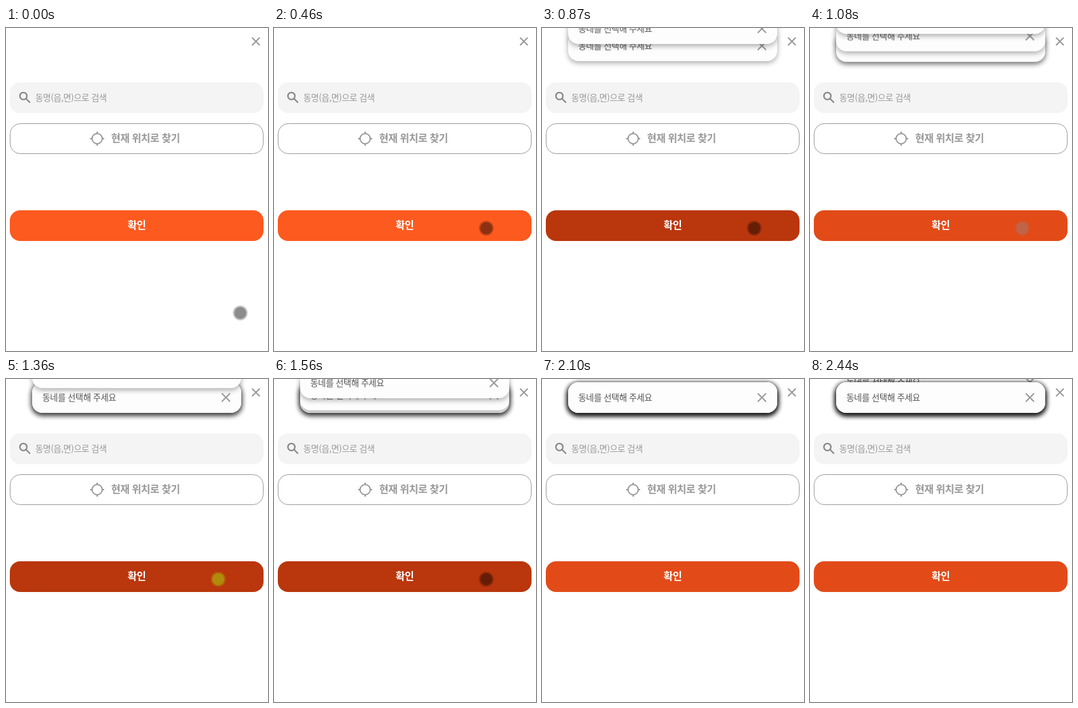
Write an HTML page that moves like this. It is 411x505 px and loops after 2.51 s.

```html
<!DOCTYPE html>
<html lang="ko">
<head>
<meta charset="utf-8">
<title>동네 선택</title>
<style>
  html, body { margin: 0; width: 100%; height: 100%; overflow: hidden; background: #fff; }
  body { position: relative; font-family: "Noto Sans CJK KR", "Noto Sans CJK", "Noto Sans", sans-serif; }
  svg { display: block; }
  text { letter-spacing: -.03em; }
  .small { font-size: 13.6px; }
  .large { font-size: 16px; font-weight: 600; }
  .icon { fill: none; stroke: #999; stroke-width: 2; }
  #screen { position: absolute; left: 0; top: 0; }
  .toast {
    position: absolute; left: 41px; top: 5px; width: 328px; height: 48px;
    border-radius: 16px; background: #fdfdfd;
    box-shadow: 0 3px 8px rgba(0, 0, 0, .34);
    transform: translateY(-90px);
  }
  .toast.leaving { box-shadow: none; }
  #cursor {
    position: absolute; left: -12px; top: -12px; width: 24px; height: 24px;
    color: rgba(0, 0, 0, .45);
  }
</style>
</head>
<body>
<svg id="screen" width="411" height="505">
  <path class="icon" d="M386 15l12 12m0-12l-12 12"/>

  <rect x="6" y="85" width="398" height="48" rx="16" fill="#f4f4f4"/>
  <g class="icon" style="stroke:#888;stroke-width:2.3">
    <circle cx="27.3" cy="106.3" r="5.5"/>
    <path d="M31.3 110.3l6.4 6.4"/>
  </g>
  <text class="small" x="46" y="114" fill="#999">동명(읍,면)으로 검색</text>

  <rect x="6.5" y="149.5" width="397" height="47" rx="16" fill="#fff" stroke="#999"/>
  <g class="icon">
    <circle cx="143" cy="173" r="8"/>
    <path d="M143 162v3m0 16v3m-11-11h3m16 0h3"/>
  </g>
  <text class="large" x="165" y="178" fill="#999">현재 위치로 찾기</text>

  <rect id="confirm" x="6" y="285" width="398" height="48" rx="16" fill="#fd5a1f"/>
  <text class="large" x="205" y="314" text-anchor="middle" fill="#fff">확인</text>
</svg>

<svg id="cursor" viewBox="-12 -12 24 24">
  <circle r="9.5" fill="currentColor"/>
  <circle r="10.5" fill="none" stroke="currentColor" stroke-width="2" opacity=".5"/>
</svg>

<script>
  const LOOP = 2510;
  const ENTER = 330;
  const HOLD = 'step-end';
  // Touch start and release times in ms; each release opens a toast.
  const presses = [
    [500, 580], [680, 765], [840, 915], [990, 1045],
    [1230, 1304], [1345, 1430], [1500, 1566]
  ];

  // Each key is [ms, properties, easing towards the next key].
  function loop(element, keys) {
    const frames = keys.map(([ms, props, easing = HOLD]) => ({ ...props, easing, offset: ms / LOOP }));
    frames.push({ ...keys[keys.length - 1][1], offset: 1 });
    element.animate(frames, { duration: LOOP, iterations: Infinity });
  }

  const shift = y => ({ transform: `translateY(${y}px)` });
  const move = (x, y) => ({ transform: `translate(${x}px, ${y}px)` });
  const fill = color => ({ fill: color });
  const tint = color => ({ color });

  function addToast(className) {
    const toast = document.createElement('div');
    toast.className = className;
    toast.innerHTML = `<svg width="328" height="48">
      <text class="small" x="16" y="29" fill="#555">동네를 선택해 주세요</text>
      <path class="icon" d="M297.500 17.500l13 13m0-13l-13 13"/>
    </svg>`;
    document.body.insertBefore(toast, cursor);
    return toast;
  }

  const cursor = document.getElementById('cursor');

  // The oldest card slips out upwards behind the stack.
  loop(addToast('toast leaving'), [
    [0, shift(-90)],
    [1970, shift(0)],
    [2070, shift(0), 'linear'],
    [2440, shift(-24)]
  ]);

  for (const [, release] of presses) {
    loop(addToast('toast'), [
      [0, shift(-90)],
      [release, shift(-53), 'ease-out'],
      [release + ENTER, shift(0)]
    ]);
  }

  loop(document.getElementById('confirm'), [
    [0, fill('#fd5a1f')],
    ...presses.flatMap(([down, up]) => [[down, fill('#ba360c')], [up, fill('#e24b18')]])
  ]);

  loop(cursor, [
    [0, move(367.5, 445.5)],
    [50, move(367.5, 445.5), 'linear'],
    [140, move(352, 380), 'linear'],
    [210, move(345, 350), 'linear'],
    [320, move(333, 313)],
    [1566, move(333, 313), 'linear'],
    [1630, move(258, 415), 'linear'],
    [1700, move(246, 432), 'linear'],
    [1760, move(305, 452)],
    [1825, move(-40, -40)]
  ]);

  const dark = tint('rgba(0, 0, 0, .45)');
  loop(cursor, [
    [0, dark],
    [1045, tint('rgba(155, 125, 120, .5)')],
    [1120, dark],
    [1345, tint('rgba(176, 146, 10, .92)')],
    [1430, dark]
  ]);
</script>
</body>
</html>
```
